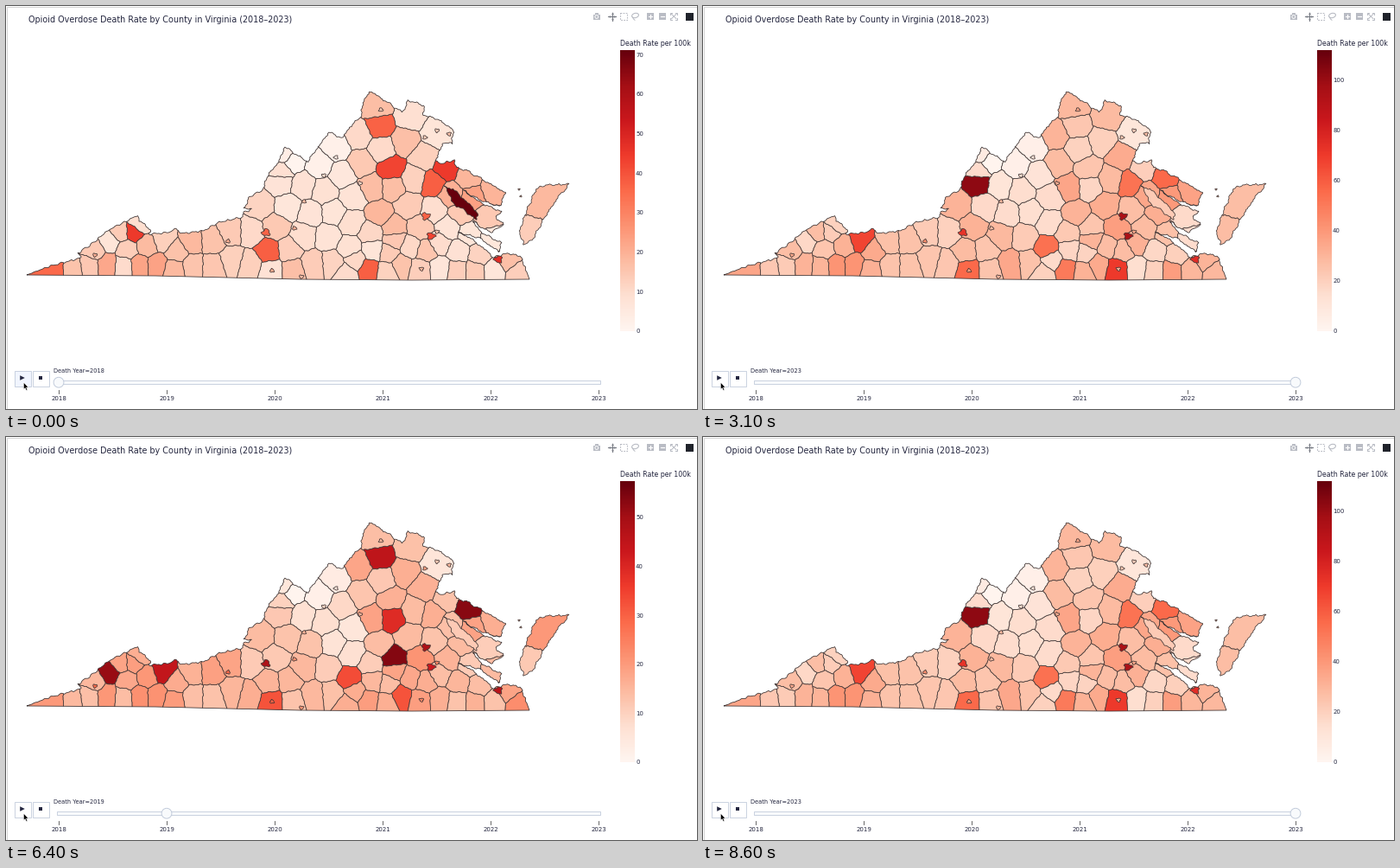
A matplotlib script for the animation above (8900 ms loop, 800x466 px).

```python
import numpy as np
import matplotlib.pyplot as plt
from matplotlib.animation import FuncAnimation
from matplotlib.collections import PolyCollection
from matplotlib.patches import Circle, Ellipse, PathPatch, Polygon, Rectangle
from matplotlib.path import Path

W, H, DPI = 800, 466, 100
PX = 72 / DPI
STEP, LOOP = 100, 8900
INK, RIM, PALE, ICON = "#24263f", "#bec8d9", "#f8fafc", "#b9bcc4"
LINE = "#3c3434"
REDS = plt.get_cmap("Reds")
COUNTIES = 100

# Scale maximum and tick spacing for each year from 2018 on
SCALES = [(71.1, 10), (57.4, 10), (102, 20), (128.3, 20), (125, 20), (111.7, 20)]
# Each run shows 2018 at its first moment, 2019 at its second, then keeps a beat
RUNS, BEAT = [(0, 1010), (5200, 5930)], 475
EVENTS = [event for reset, go in RUNS
          for event in [(reset, 0)] + [(go + BEAT * k, k + 1) for k in range(5)]]

# Key points of the state border, clockwise from the south-west tip
WEST_EDGE = [
    (24, 311), (50, 301), (87, 291), (84, 286), (108, 268), (122, 257), (152, 242),
    (155, 249), (167, 258), (166, 264), (187, 262), (197, 257), (203, 263), (229, 260),
    (246, 250), (275, 244), (274, 239), (284, 235), (276, 233), (281, 222), (298, 212),
    (301, 199), (317, 178), (323, 163), (349, 180), (374, 146)]
NORTH_EDGE = [
    (390, 153), (397, 141), (411, 128), (413, 113), (421, 98), (459, 123), (466, 109),
    (484, 115), (483, 126), (500, 131), (518, 143), (516, 159), (506, 158), (497, 179),
    (504, 182), (519, 178), (521, 187), (533, 190), (556, 203)]
BAY_EDGE = [
    (578, 216), (572, 232), (548, 224), (529, 213), (552, 229), (574, 238), (566, 243),
    (577, 253), (561, 262), (540, 249), (549, 261), (574, 274), (570, 284), (548, 268),
    (525, 262), (540, 270), (561, 287), (564, 291), (580, 286), (596, 289), (606, 316),
    (470, 317), (340, 316), (173, 312)]
EASTERN_SHORE = [
    [(652, 206), (625, 207), (614, 211), (601, 241), (622, 247), (637, 224)],
    [(601, 241), (594, 262), (600, 276), (609, 271), (622, 247)]]
RIVER_STRIP = [(508, 209), (518, 212), (532, 225), (546, 239), (545, 248),
               (529, 235), (519, 230)]

# Counties that stand out in at least one year
PLACES = dict(
    tip=(55, 303), ridge=(120, 272), corner=(148, 261), valley=(182, 271),
    peak=(331, 179), spring=(318, 204), lake=(304, 284), mill=(307, 306),
    tobacco=(378, 297), court=(398, 280), border=(420, 304), gate=(432, 139),
    orchard=(446, 189), hill=(448, 209), bend=(432, 241), camp=(449, 257),
    south=(457, 299), junction=(480, 304), forest=(495, 205), landing=(510, 188),
    neck=(535, 198), point=(564, 213))
HOT = {
    0: dict(tip=.5, corner=.63, lake=.53, border=.53, gate=.52, orchard=.6,
            forest=.53, landing=.63),
    1: dict(ridge=.9, valley=.78, mill=.56, court=.58, gate=.79, hill=.68,
            camp=.94, south=.56, neck=.93),
    3: dict(valley=.65, mill=.83, tobacco=.45, court=.53, forest=.57, point=.7),
    4: dict(corner=.9, ridge=.76, mill=.65, tobacco=.53, bend=.53, south=.56),
    5: dict(spring=.92, valley=.6, mill=.5, court=.48, border=.45, junction=.63,
            forest=.47, neck=.5)}
# Typical shade per year, and areas (x, y, reach) that stay paler
TYPICAL = {0: .2, 1: .29, 3: .28, 4: .28, 5: .25}
QUIET = [(340, 182, 45), (375, 165, 30), (495, 135, 32), (390, 243, 38)]
STRIP = {0: 1, 1: .2, 3: .58, 4: .5, 5: .2}
CITIES = [(301, 262), (486, 243), (492, 266), (570, 293)]
TOWNS = [(103, 288), (257, 272), (345, 226), (368, 196), (382, 175), (410, 205),
         (434, 120), (485, 152), (499, 144), (513, 148), (334, 257), (308, 306),
         (342, 313), (481, 304), (499, 261)]


def warp(points, size):
    """Bend points slightly so borders wander; the southern line stays straight."""
    x, y = np.asarray(points, float).T
    amount = size * np.clip((311 - y) / 12, 0, 1)
    dx = 0.9 * np.sin(0.61 * y + 0.23 * x) + 0.6 * np.sin(1.3 * y - 0.4 * x)
    dy = 0.9 * np.sin(0.57 * x - 0.19 * y) + 0.6 * np.sin(1.2 * x + 0.5 * y)
    return np.column_stack([x + amount * dx, y + amount * dy])


def rough(points, size=0.8, gap=1.5):
    pts = np.asarray(points, float)
    dense = []
    for a, b in zip(pts, np.roll(pts, -1, axis=0)):
        n = max(1, int(np.hypot(*(b - a)) / gap))
        dense.extend(a + (b - a) * k / n for k in range(n))
    return warp(dense, size)


def spread_seeds(fixed, outline, rng):
    """Even out random county centres inside the state, keeping the fixed ones."""
    grid = np.stack(np.meshgrid(np.arange(24, 608, 3), np.arange(96, 318, 3)), -1)
    inside = grid.reshape(-1, 2).astype(float)
    inside = inside[outline.contains_points(inside)]
    weight = 1 + 2 * (inside[:, 0] / 600) ** 4
    start = rng.choice(len(inside), COUNTIES - len(fixed), replace=False)
    seeds = np.vstack([fixed, inside[start]])
    for _ in range(30):
        gaps = ((inside[:, None] - seeds) ** 2).sum(-1)
        owner = gaps.argmin(1)
        for i in range(len(fixed), COUNTIES):
            mine = owner == i
            if mine.any():
                seeds[i] = np.average(inside[mine], axis=0, weights=weight[mine])
    return seeds


def clip_half(poly, mid, normal):
    """Keep the part of poly on the side the normal points away from."""
    kept = []
    for a, b in zip(poly, poly[1:] + poly[:1]):
        da, db = np.dot(a - mid, normal), np.dot(b - mid, normal)
        if da <= 0:
            kept.append(a)
        if da * db < 0:
            kept.append(a + (b - a) * da / (da - db))
    return kept


def cell(i, seeds):
    poly = [np.array(p, float) for p in ((10, 90), (620, 90), (620, 325), (10, 325))]
    order = np.argsort(np.hypot(*(seeds - seeds[i]).T))[1:30]
    for j in order:
        poly = clip_half(poly, (seeds[i] + seeds[j]) / 2, seeds[j] - seeds[i])
    return rough(poly, 0.45)


def blob(x, y, r):
    a = np.linspace(0, 2 * np.pi, 14, endpoint=False)
    radius = r * (1 + 0.25 * np.sin(3 * a + x) + 0.15 * np.sin(5 * a + y))
    return np.column_stack([x + radius * np.cos(a), y + 0.85 * radius * np.sin(a)])


def shade_field(points, rng):
    """Shades per year: a lasting local level, yearly chance and paler areas."""
    x, y = np.asarray(points, float).T
    calm = np.ones(len(x))
    for qx, qy, reach in QUIET:
        calm -= 0.62 * np.exp(-((x - qx) ** 2 + (y - qy) ** 2) / reach ** 2)
    lasting = rng.uniform(-0.06, 0.06, len(x))
    return {year: np.clip(calm, 0.1, 1) * np.clip(
                level + lasting + rng.uniform(-0.07, 0.07, len(x)), 0, 1)
            for year, level in TYPICAL.items()}


def fill_gap_year(shades):
    shades[2] = (shades[1] + shades[3]) / 2
    return shades


fig = plt.figure(figsize=(W / DPI, H / DPI), dpi=DPI, facecolor="white")
ax = fig.add_axes([0, 0, 1, 1])
ax.axis("off")


def text(x, y, s, size, ha="left"):
    return ax.text(x, y, s, fontsize=size * PX, color=INK, ha=ha,
                   va="baseline", family="DejaVu Sans")


def box(x, y, w, h, fill, edge="none", lw=0.8, **kw):
    return ax.add_patch(Rectangle((x, y), w, h, fc=fill, ec=edge, lw=lw * PX, **kw))


def stroke(xs, ys, color=ICON, lw=1.0, **kw):
    ax.plot(xs, ys, color=color, lw=lw * PX, **kw)


def regions(polygons, zorder):
    return ax.add_collection(PolyCollection(
        polygons, edgecolors=LINE, linewidths=0.75 * PX, zorder=zorder))


# Map
rng = np.random.default_rng(18)
border = rough(WEST_EDGE + NORTH_EDGE + BAY_EDGE)
outline = Path(np.vstack([border, border[:1]]), closed=True)
seeds = spread_seeds(np.array(list(PLACES.values()), float), outline, rng)

land = regions([cell(i, seeds) for i in range(COUNTIES)], 2)
land.set_clip_path(outline, ax.transData)
ax.add_patch(PathPatch(outline, fc="none", ec=LINE, lw=0.8 * PX, zorder=3))
extras = regions([rough(RIVER_STRIP)] + [rough(p) for p in EASTERN_SHORE]
                 + [blob(*p, 4.6) for p in CITIES] + [blob(*p, 2.4) for p in TOWNS], 4)
for x, y in ((594, 212), (596, 220)):
    ax.add_patch(Polygon(blob(x, y, 1.1), fc="#fcbba1", ec=LINE, lw=0.7 * PX))

land_shades = shade_field(seeds, rng)
shore_shades = shade_field([p[0] for p in EASTERN_SHORE], rng)
town_shades = shade_field(TOWNS, rng)
names = list(PLACES)
extra_shades = {}
for year in TYPICAL:
    land_shades[year][names.index("peak")] = 0.01
    for name, shade in HOT[year].items():
        land_shades[year][names.index(name)] = shade
    city_shades = rng.uniform(0.65, 0.95, len(CITIES)) - 0.15 * (year == 0)
    extra_shades[year] = np.concatenate([
        [STRIP[year]], shore_shades[year], city_shades, 1.4 * town_shades[year]])
fill_gap_year(land_shades)
fill_gap_year(extra_shades)

# Colour scale
ax.imshow(np.linspace(1, 0, 256)[:, None], cmap=REDS, aspect="auto",
          extent=(711, 728, 376, 51), interpolation="bilinear")
ax.set_xlim(0, W)
ax.set_ylim(H, 0)
scale_labels = [text(729, 0, "", 6.9) for _ in range(8)]

text(26, 19.2, "Opioid Overdose Death Rate by County in Virginia (2018–2023)", 9.6)
text(711, 46.2, "Death Rate per 100k", 7.85)

# Toolbar
box(679.5, 9.5, 8.5, 6, ICON)
box(682, 8.3, 3.6, 1.6, ICON)
ax.add_patch(Circle((683.8, 12.5), 1.9, fc=ICON, ec="white", lw=0.9 * PX))
PAN = "#777b84"
stroke([697, 706], [12, 12], PAN, 1.1)
stroke([701.5, 701.5], [7.5, 16.5], PAN, 1.1)
for mark, x, y in (("<", 697.7, 12), (">", 705.3, 12), ("^", 701.5, 8.2), ("v", 701.5, 15.8)):
    ax.plot(x, y, mark, color=PAN, ms=2.6 * PX, mew=0)
box(711, 8, 8, 8, "none", ICON, 1.1, ls=(0, (1.6, 1.2)))
ax.add_patch(Ellipse((728.5, 11), 8, 5.2, angle=-15, fc="none", ec=ICON, lw=1.1 * PX))
stroke([725.5, 726.5, 728], [13, 15, 16.3])
for x in (742, 755.8):
    box(x, 8, 8, 8, ICON)
    stroke([x + 1.8, x + 6.2], [12, 12], "white", 1.2)
stroke([746, 746], [9.8, 14.2], "white", 1.2)
stroke([770.5, 776], [9.3, 14.7])
stroke([770.5, 776], [14.7, 9.3])
for sx in (-1, 1):
    for sy in (-1, 1):
        x, y = 773.2 + 4 * sx, 12 + 4 * sy
        stroke([x - 2.2 * sx, x, x], [y, y, y - 2.2 * sy])
box(786.5, 7.5, 9, 9, "#20232b")

# Buttons and slider
play_button = box(9.5, 421.5, 19.5, 18.5, "white", RIM)
box(30.5, 421.5, 19.5, 18.5, "white", RIM)
ax.add_patch(Polygon([(16.2, 427.2), (16.2, 432.8), (21.8, 430)], fc=INK, ec="none"))
box(38.2, 428.2, 3.8, 3.8, INK)
year_label = text(55, 424.4, "", 6.7)
box(58.5, 433.2, 629, 3.8, PALE, RIM)
for k in range(6):
    stroke([61 + 125 * k] * 2, [444, 447.5], "#444444", 0.8)
    text(61 + 125 * k, 456.5, str(2018 + k), 6.95, "center")
handle = ax.add_patch(Circle((61, 435.2), 5.9, fc=PALE, ec=RIM, lw=0.9 * PX, zorder=5))

pointer = np.array([(0, 0), (0, 8.4), (1.9, 6.7), (3.2, 9.7), (4.6, 9.1),
                    (3.3, 6.1), (5.8, 6.1)])
ax.add_patch(Polygon(pointer + (20.3, 435), fc="black", ec="white", lw=0.6 * PX, zorder=6))
box(0.5, 0.5, W - 1, H - 1, "none", "#d4d4d4", 1)


def ease(p):
    p = min(max(p, 0), 1)
    return 4 * p ** 3 if p < 0.5 else 1 - 4 * (1 - p) ** 3


def draw(frame):
    t = frame * STEP
    current = max(k for k, (start, _) in enumerate(EVENTS) if start <= t)
    start, year = EVENTS[current]
    before = EVENTS[current - 1][1] if current else year
    # The map redraws a moment after the slider sets off
    shown = year if t - start >= 50 else before

    land.set_facecolor(REDS(land_shades[shown]))
    extras.set_facecolor(REDS(extra_shades[shown]))
    top, gap = SCALES[shown]
    for k, label in enumerate(scale_labels):
        value = k * gap
        label.set_text(str(value) if value <= top else "")
        label.set_y(376 - 325 * value / top + 2.5)

    year_label.set_text(f"Death Year={2018 + year}")
    position = before + (year - before) * ease((t - start) / 150)
    handle.center = (61 + 125 * position, 435.2)
    play_button.set_facecolor("#f1f5ff" if t < 500 else "white")
    return ()


anim = FuncAnimation(fig, draw, frames=LOOP // STEP, interval=STEP,
                     repeat=True, repeat_delay=0, blit=False)
plt.show()
```
